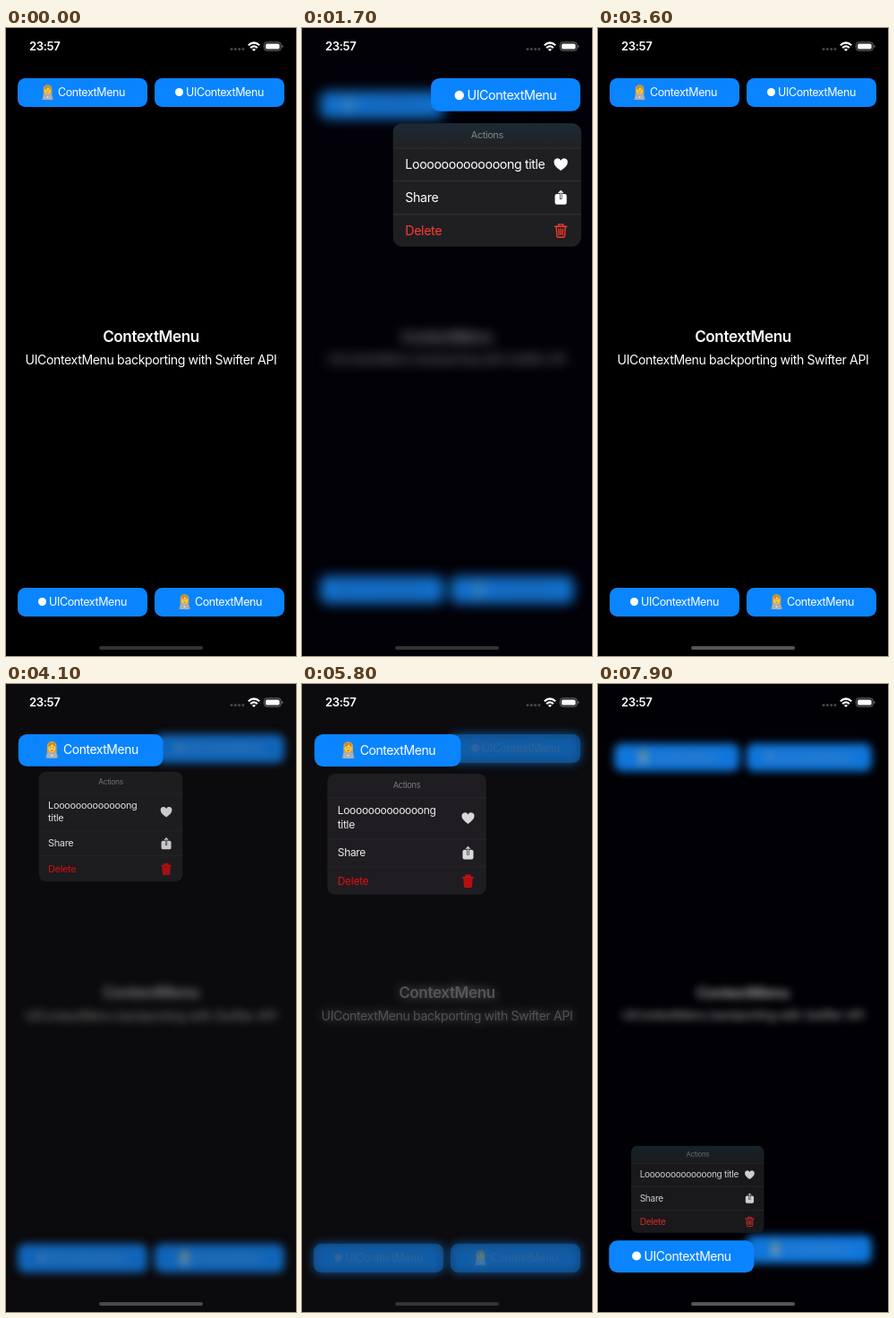
Animation of 324 by 700 pixels, one loop 8000 ms. Source, as an HTML page:

```html
<!DOCTYPE html>
<html lang="en">
<head>
<meta charset="utf-8">
<title>Context menu</title>
<style>
  html, body { margin: 0; width: 100%; height: 100%; overflow: hidden; background: #000; }
  body { font-family: Inter, sans-serif; letter-spacing: -.024em; color: #fff; white-space: nowrap; }
  #stage { position: absolute; left: 0; top: 0; width: 324px; height: 700px; overflow: hidden; }
  #stage div { position: absolute; }
  .page { inset: 0; transform-origin: 162px 355.5px; --mix: calc(var(--fade) * 100%);
    --ink: #999; --fill: #1270cc; }
  .page.dark { --ink: #606060; --fill: #125ca4; }
  .page h1, .page p { position: absolute; left: 0; width: 324px; margin: 0; text-align: center;
    color: color-mix(in srgb, var(--ink) var(--mix), #fff); }
  .page h1 { top: 333px; font: 600 17.1px/22px Inter, sans-serif; }
  .page p { top: 359px; font-size: 14.1px; line-height: 22px; }
  .button { width: 145px; height: 32px; border-radius: 8.5px; background: #0a84ff;
    display: flex; align-items: center; justify-content: center; font-size: 12.46px; }
  .button svg { width: 17px; height: 17px; margin-right: 3px; }
  .button i { width: 9px; height: 9px; margin-right: 3px; border-radius: 50%; background: currentColor; }
  .page .button { color: color-mix(in srgb, #1a5290 var(--mix), #fff);
    background: color-mix(in srgb, var(--fill) var(--mix), #0a84ff); }
  .page .button svg { opacity: calc(1 - .7 * var(--fade)); }
  .menu { width: 208px; border-radius: 10px; overflow: hidden; background: #1f1f21; font-size: 14.1px; }
  .menu header { height: 26.6px; font-size: 10.8px; color: #85858a; display: flex;
    align-items: center; justify-content: center; background: linear-gradient(#1c2a35, #212224); }
  .menu section { position: relative; height: 36.6px; padding-left: 13.5px; line-height: 18.6px;
    display: flex; align-items: center; box-sizing: border-box; border-top: 1px solid #343437; }
  .menu section:last-child { color: #ff3a30; }
  .menu svg { position: absolute; left: 177px; width: 17px; height: 17px; }
  .custom { background: #211f23; }
  .custom header { height: 30.5px; background: none; }
  .custom section { border-color: #2b2a2e; }
  .custom section:nth-child(2) { height: 54px; }
  .custom section:last-child { color: #f31010; }
  .custom svg { left: 175px; width: 18.5px; height: 18.5px; opacity: .9; }
  .custom section:last-child path { fill: currentColor; fill-opacity: .7; }
  #clock { left: 26px; top: 12px; font-size: 13.1px; font-weight: 600; line-height: 17px; }
  #home { left: 104px; top: 689px; width: 116px; height: 4px; border-radius: 2px; }
</style>
</head>
<body>
<div id="stage"></div>
<script>
const stage = document.getElementById('stage');

const svg = (size, body) => `<svg viewBox="0 0 ${size} ${size}" fill="currentColor">${body}</svg>`;
const icons = {
  heart: svg(17, '<path d="M8.5 15.2C4 12 1 9.4 1 6a3.9 3.9 0 0 1 7.5-1.9A3.9 3.9 0 0 1 16 6c0 3.4-3 6-7.5 9.2z"/>'),
  share: svg(17, `<rect x="2" y="5" width="13" height="11.5" rx="2.2"/>
    <path d="M8.5 11V2M5.8 4 8.5 1.3 11.2 4" fill="none" stroke="#1f1f21" stroke-width="2.6"/>
    <path d="M8.5 10.5v-9M6 4l2.5-2.5L11 4" fill="none" stroke="currentColor" stroke-width="1.2"/>`),
  trash: svg(17, `<g fill="none" stroke="currentColor" stroke-width="1.3" stroke-linecap="round">
    <path d="M2 3.8h13M6 3.5v-2h5v2M3.5 4l.7 10.5q.1 1.2 1.3 1.2h6q1.2 0 1.3-1.2L13.5 4M8.5 6.5V13M6.2 6.5l.2 6.500M10.8 6.5l-.2 6.5"/></g>`),
  coder: svg(16, `<path d="M3.5 11V4.5a4.5 4.3 0 0 1 9 0V11z" fill="#d9a441"/>
    <path d="M2 16q0-5.500 6-5.500T14 16z" fill="#7e9a9c"/>
    <ellipse cx="8" cy="6.3" rx="3.2" ry="4" fill="#ffcf52"/>
    <path d="M4.5 5.5Q7.5 5 8.5 2.5q.8 2.3 3 3l-1-4h-5z" fill="#c08a2e"/>
    <path d="M6.5 6h.8M8.8 6h.8M6.9 8.4q1.1.7 2.2 0" stroke="#6b4517" stroke-width=".8"/>
    <rect x="3.3" y="10.5" width="9.4" height="5.5" rx=".8" fill="#a9b0b8"/>
    <circle cx="8" cy="13.2" r=".8" fill="#e3e7ea"/>`)
};

const add = (className, html = '') => {
  const node = document.createElement('div');
  node.className = className;
  node.innerHTML = html;
  return stage.appendChild(node);
};

const spots = [[13, 55.5, true], [166, 55.5, false], [13, 623.5, false], [166, 623.5, true]];
const button = ([x, y, custom]) => `<div class="button" style="left:${x}px;top:${y}px">` +
  (custom ? icons.coder + 'ContextMenu' : '<i></i>UIContextMenu') + '</div>';

const longTitle = 'L' + 'o'.repeat(13) + 'ng';
const menuRows = custom => `<header>Actions</header>
  <section><span>${longTitle}${custom ? '<br>' : ' '}title</span>${icons.heart}</section>
  <section>Share${icons.share}</section>
  <section>Delete${icons.trash}</section>`;

const pageHtml = spots.map(button).join('') +
  '<h1>ContextMenu</h1><p>UIContextMenu backporting with Swifter API</p>';
const blurred = add('page', pageHtml);
const sharp = add('page', pageHtml);

// Origins are stage coordinates: `lift` for the button, `pivot` for the menu.
const sessions = [
  { spot: 1, press: 800, open: 1330, span: 667, close: 2600, closed: 3100,
    lift: [311, 55.5], menu: [103, 105.5], pivot: [228, 85] },
  { spot: 0, custom: true, press: 3600, open: 3932, span: 580, close: 5700, closed: 6100,
    lift: [6, 55.5], menu: [13, 103.5], pivot: [117, 76] },
  { spot: 2, press: 7200, open: 7730, span: 667, close: 9000, closed: 9500,
    lift: [19, 655.5], menu: [13, 469.6], pivot: [97, 626] }
];
for (const s of sessions) {
  const [x, y] = spots[s.spot];
  const originAt = ([ox, oy], left, top) => `${ox - left}px ${oy - top}px`;
  s.layer = add('', button(spots[s.spot]));
  s.button = s.layer.firstChild;
  s.button.style.transformOrigin = originAt(s.lift, x, y);
  s.panel = add('menu' + (s.custom ? ' custom' : ''), menuRows(s.custom));
  Object.assign(s.panel.style, { left: s.menu[0] + 'px', top: s.menu[1] + 'px',
    transformOrigin: originAt(s.pivot, ...s.menu) });
}

add('').outerHTML = '<div id="clock">23:57</div><div id="home"></div>';
add('', `<svg width="324" height="40" fill="#fff" style="display:block">
  <g fill="#48484a">${[0, 1, 2, 3].map(i => `<circle cx="${252 + 4.3 * i}" cy="23.5" r="1.5"/>`).join('')}</g>
  <g fill="none" stroke="#fff" stroke-width="2.2">
    <path d="M270.8 19.3q6.2-5.6 12.4 0M273.2 22.1q3.8-3.3 7.6 0"/></g>
  <path d="M277 26l-2.1-2.3q2.1-1.6 4.2 0z"/>
  <rect x="288.5" y="15.9" width="18.6" height="9.2" rx="2.7" fill="none" stroke="#777"/>
  <rect x="290" y="17.4" width="15.6" height="6.2" rx="1.5"/>
  <path d="M308.3 19v3q1.3-.4 1.3-1.5t-1.3-1.5z" fill="#777"/></svg>`);
const home = document.getElementById('home');

const ramp = (t, from, to) => Math.min(1, Math.max(0, (t - from) / (to - from)));
const easeInOut = x => .5 - .5 * Math.cos(Math.PI * x);
const easeOutBack = x => 1 + 1.9 * (x - 1) ** 3 + .9 * (x - 1) ** 2;

function render(t) {
  let openness = 0, blur = 0, zoom = 1, sharpness = 1, blurOpacity = 0;
  let shade = [0, 0, 0], hidden = -1, dark = false;

  for (const s of sessions) {
    const active = t >= s.press && t < s.closed;
    s.layer.style.display = s.panel.style.display = active ? '' : 'none';
    if (!active) continue;
    const closing = t > s.close;
    const back = 1 - easeInOut(ramp(t, s.close, s.closed));
    const p = easeOutBack(ramp(t, s.open, s.open + s.span)) * back;
    const press = easeInOut(ramp(t, s.press, s.open)) * back;
    hidden = s.spot;
    openness = Math.min(1, p);

    s.button.style.transform = `scale(${s.custom ? 1 + .15 * p : 1 + .04 * press + .11 * p})`;
    s.panel.style.transform = `scale(${p})`;
    s.panel.style.opacity = Math.min(1, .2 + .85 * openness);

    if (s.custom) {
      dark = true;
      blur = closing ? 5.2 : 5.2 * Math.min(1, 1.2 * p);
      blurOpacity = closing ? openness : 1;
      sharpness = closing ? Math.min(1, 4 * (1 - openness)) : 0;
      shade = [14, 13, 16];
    } else {
      blur = .6 * press + 6.4 * openness;
      blurOpacity = 1;
      sharpness = 0;
      zoom = 1 - .048 * p;
      shade = [2, 1, 7];
    }
  }

  stage.style.background = `rgb(${shade.map(c => c * openness)})`;
  blurred.style.filter = `blur(${blur}px)`;
  blurred.style.opacity = blurOpacity;
  sharp.style.opacity = sharpness;
  for (const page of [blurred, sharp]) {
    page.classList.toggle('dark', dark);
    page.style.transform = `scale(${zoom})`;
    page.style.setProperty('--fade', openness);
    spots.forEach((_, i) => page.children[i].style.visibility = i === hidden ? 'hidden' : '');
  }

  const glow = ramp(t, 2000, 2400) - ramp(t, 4000, 4300) + ramp(t, 5800, 6100);
  const grey = 51 + 34 * glow;
  home.style.background = `rgb(${grey},${grey},${grey})`;
}

// The screen updates ten times a second.
function tick() {
  render(Math.floor(performance.now() % 8000 / 100) * 100);
  requestAnimationFrame(tick);
}
tick();
</script>
</body>
</html>
```
